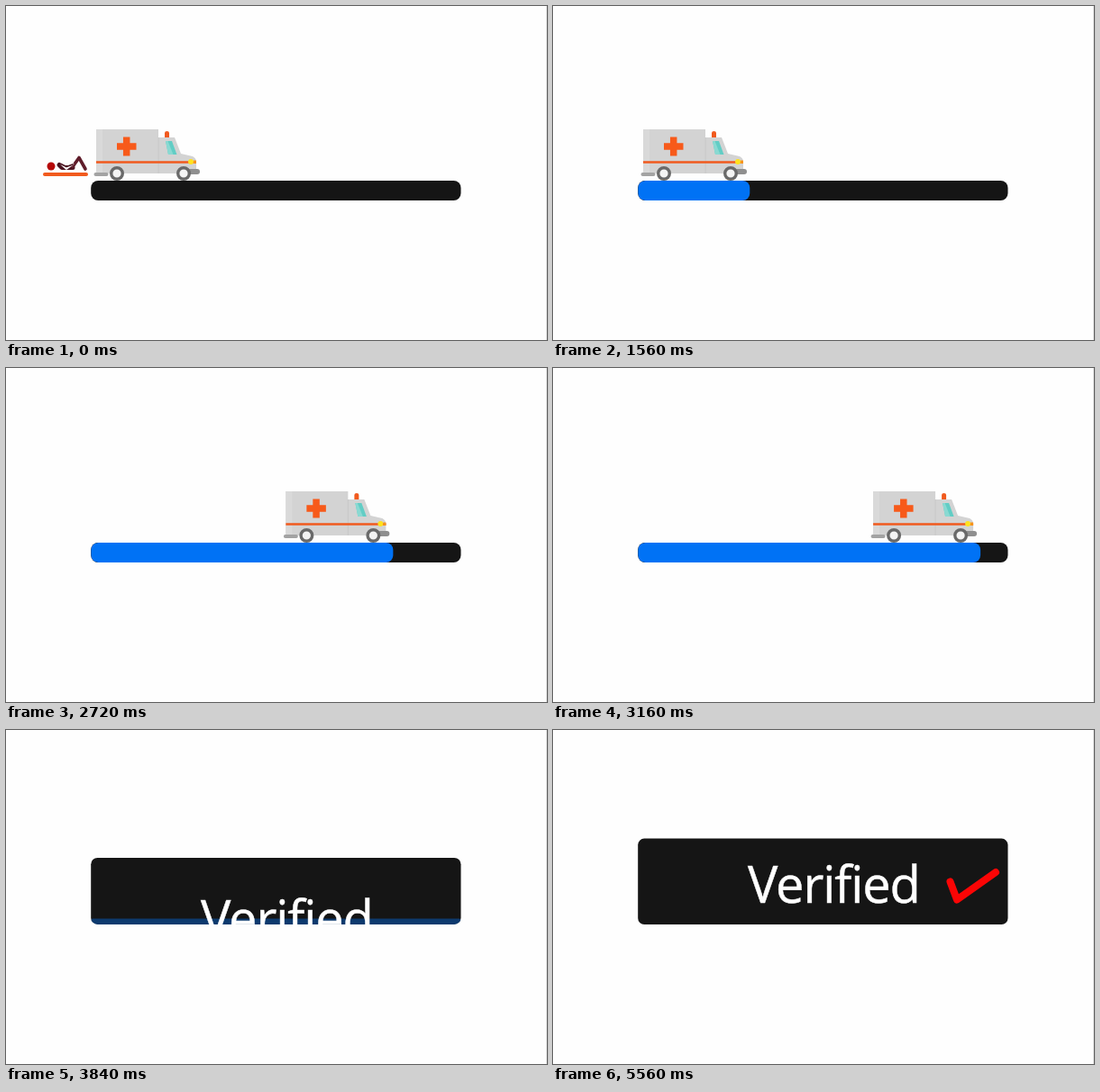
An HTML page for the animation above (5800 ms loop, 600x371 px).

```html
<!DOCTYPE html>
<html lang="en">
<head>
<meta charset="utf-8">
<title>Ambulance progress</title>
<style>
html, body { margin: 0; width: 100%; height: 100%; overflow: hidden; background: #fefefe; }
svg { display: block; width: 100%; height: 100%; }
text {
  font: 56px "Open Sans", "Noto Sans", sans-serif;
  letter-spacing: -1.1px; fill: #fff; stroke: #fff; stroke-width: 0.5px;
}
</style>
</head>
<body>
<svg viewBox="0 0 600 371">
  <defs>
    <clipPath id="outside"><rect x="0" y="130" width="100" height="64"/></clipPath>
    <clipPath id="inside"><rect id="window" x="94.2" width="410.300" rx="7.5"/></clipPath>
  </defs>
  <rect width="600" height="371" fill="#fefefe"/>
  <rect x="599" width="1" height="371" fill="#d4d4d4"/>

  <rect id="bar" x="94.2" width="410.300" fill="#151515"/>
  <g clip-path="url(#inside)">
    <rect id="fill" x="94.2" fill="#0072f5"/>
    <text id="label" x="216">Verified</text>
  </g>
  <path id="tick" d="M440.500 168.500L448 188.500L491 158" fill="none" stroke="#fb0505" stroke-width="8"
    stroke-linecap="round" stroke-linejoin="round" pathLength="100" stroke-dasharray="100 200"/>

  <g clip-path="url(#outside)">
    <g id="patient" fill="none" stroke-linecap="round" stroke-linejoin="round">
      <path d="M43 187H89" stroke="#f15a1e" stroke-width="4"/>
      <circle cx="50" cy="178" r="4.5" fill="#b50808"/>
      <path d="M59 176.500L62 179.500H74" stroke="#4a1420" stroke-width="5"/>
      <path d="M74 178.500L81 168.500L88 181" stroke="#5f1c2a" stroke-width="3.600"/>
      <path d="M62 176L67 180.500L74 175.500" stroke="#fff" stroke-width="2.600"/>
      <path d="M61 175.500L67 178.500L74 176" stroke="#4a1420" stroke-width="1.800"/>
    </g>
  </g>

  <g id="van">
    <path d="M100 137H169V146H187L194 164L207 167Q211 169 211 173V186H100Z" fill="#d3d3d3"/>
    <path d="M100 137H107V186H100Z" fill="#d9d9d9"/>
    <path d="M169 146V186" stroke="#c8c8c8"/>
    <path d="M100 173.500H211" stroke="#f15a1e" stroke-width="2.600"/>
    <path d="M123 156H144.500M133.700 145.500V166.500" stroke="#f75a1a" stroke-width="7.500"/>
    <path d="M176 146V141Q176 139 178.500 139Q181 139 181 141V146Z" fill="#f15a1e"/>
    <path d="M177 150H184L189.500 165H180Z" fill="#62cdc5"/>
    <path d="M177 150H179.500L185.500 165H180Z" fill="#8ad9d2"/>
    <rect x="97.500" y="185" width="16" height="4" rx="2" fill="#a3a3a3"/>
    <rect x="201" y="181" width="14" height="6" rx="3" fill="#8f8f8f"/>
    <circle cx="205" cy="173" r="3" fill="#ffe21f"/>
    <path d="M208 171.500H211V175H208Z" fill="#f7941d"/>
    <g fill="#f4f4f4" stroke="#6a6a6a" stroke-width="3.400">
      <circle cx="123" cy="186" r="6.300"/>
      <circle cx="197" cy="186" r="6.300"/>
    </g>
  </g>
</svg>
<script>
const LOOP = 5800, LEFT = 94.2, BOTTOM = 216;
const el = id => document.getElementById(id);
const set = (id, attrs) => {
  for (const key in attrs) el(id).setAttribute(key, attrs[key]);
};
const ramp = (t, from, to) => Math.min(1, Math.max(0, (t - from) / (to - from)));

// right edge of the progress fill: [ms, x]
const edgeKeys = [[1180, 95], [1560, 218], [2160, 353], [3160, 474], [3600, 504.5]];

// smooth monotone interpolation through keys
function track(keys, t) {
  const last = keys.length - 1;
  if (t <= keys[0][0]) return keys[0][1];
  if (t >= keys[last][0]) return keys[last][1];
  const secant = i => (keys[i + 1][1] - keys[i][1]) / (keys[i + 1][0] - keys[i][0]);
  const slope = i => {
    if (i === 0) return secant(0);
    if (i === last) return secant(last - 1);
    const a = secant(i - 1), b = secant(i);
    return 2 * a * b / (a + b);
  };
  let i = 0;
  while (t > keys[i + 1][0]) i++;
  const [t0, a] = keys[i], [t1, b] = keys[i + 1];
  const d = t1 - t0, u = (t - t0) / d, v = 1 - u;
  return v * v * (1 + 2 * u) * a + u * u * (3 - 2 * u) * b
    + d * u * v * (v * slope(i) - u * slope(i + 1));
}

function draw(t) {
  const edge = track(edgeKeys, t);
  const rise = 1 - Math.pow(1 - ramp(t, 3600, 4160), 2.2);
  const top = 194 - 73.4 * rise;
  const box = { y: top, height: BOTTOM - top, rx: 8 - rise };
  set("bar", box);
  set("window", box);

  const thick = 22 * (1 - rise);
  set("fill", {
    y: BOTTOM - thick,
    height: thick,
    width: t < edgeKeys[0][0] ? 0 : edge - LEFT,
    rx: 8 * (1 - rise),
    opacity: 1 - 0.85 * rise
  });

  set("label", { y: 192.3 + 131 * (1 - rise), opacity: rise > 0 ? 1 : 0 });

  const tick = ramp(t, 4000, 4320);
  set("tick", { "stroke-dashoffset": 100 * (1 - tick), opacity: tick > 0 ? 1 : 0 });

  const ride = ramp(t, 600, 1400);
  set("patient", { transform: `translate(${64 * ride})`, opacity: ride < 1 ? 1 : 0 });
  set("van", {
    transform: `translate(${Math.max(0, edge - 219)})`,
    opacity: 1 - ramp(t, 3600, 3780)
  });
}

const start = performance.now();
function loop(now) {
  draw(Math.max(0, now - start) % LOOP);
  requestAnimationFrame(loop);
}
draw(0);
requestAnimationFrame(loop);
</script>
</body>
</html>
```
